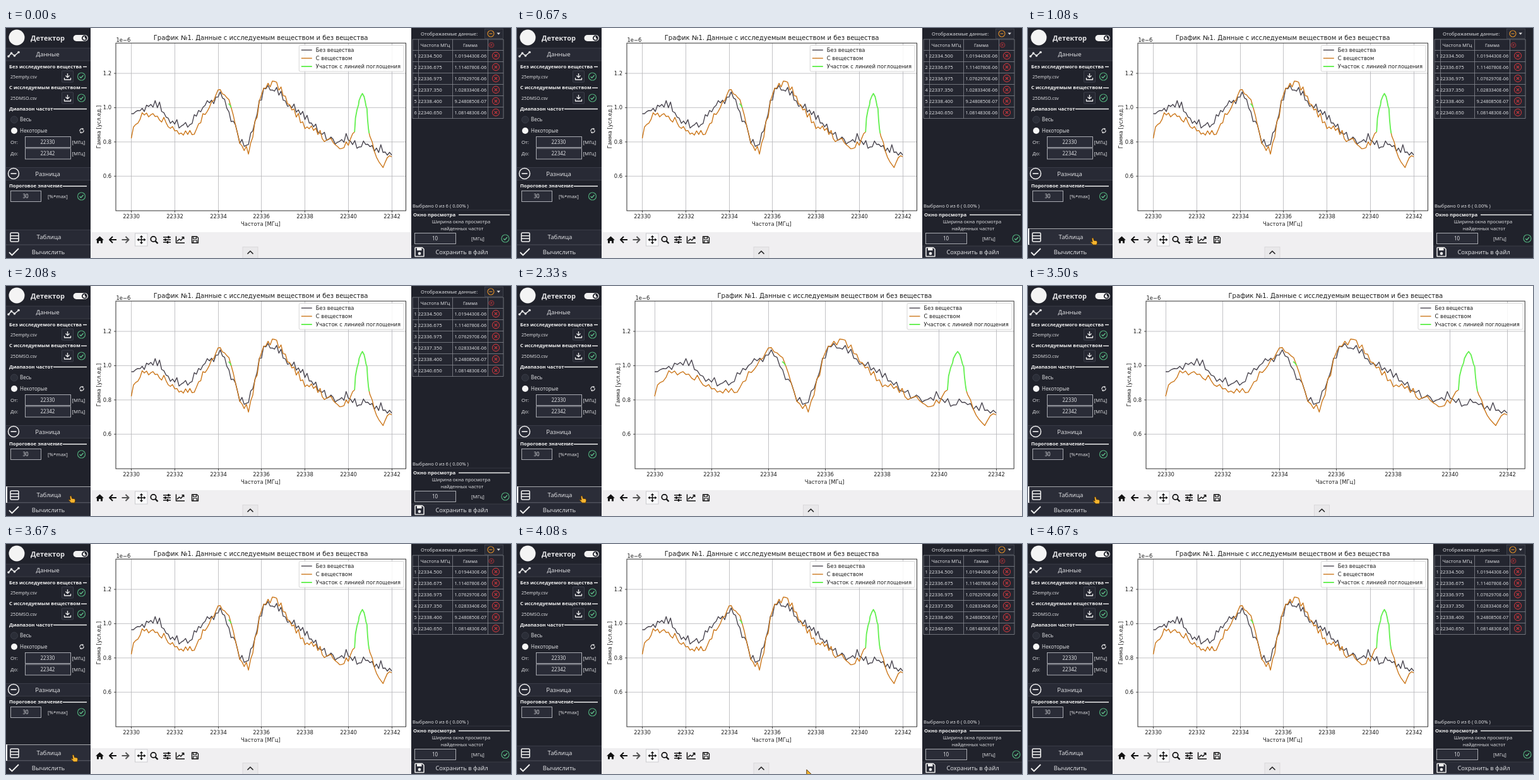
These frames come from a looping animation (800x365 px, 4.76 s). An HTML page:

```html
<!DOCTYPE html>
<html lang="ru">
<head>
<meta charset="utf-8">
<title>Детектор</title>
<style>
  html, body { margin: 0; width: 100%; height: 100%; overflow: hidden; background: #fff; }
  svg { display: block; width: 800px; height: 365px; }
  text { font-family: "Noto Sans", sans-serif; white-space: pre; }
  .plot text { font-family: "DejaVu Sans", sans-serif; }
</style>
</head>
<body>
<svg id="stage" viewBox="0 0 800 365" xmlns="http://www.w3.org/2000/svg"></svg>
<script>
const LOOP = 4760, FPS = 12;
const BG = '#20222b', ROW = '#282a35', FG = '#dcdde0', EDGE = '#3a3c47';
const DARK = '#4a4650', ORANGE = '#cc781c', GREEN = '#62f04e';

const rect = (x, y, w, h, fill, extra = '') =>
  `<rect x="${x}" y="${y}" width="${w}" height="${h}" fill="${fill}" ${extra}/>`;
const path = (d, stroke, w = 1, fill = 'none') =>
  `<path d="${d}" stroke="${stroke}" stroke-width="${w}" fill="${fill}" stroke-linejoin="round"/>`;
const circle = (x, y, r, fill, stroke = 'none', w = 1) =>
  `<circle cx="${x}" cy="${y}" r="${r}" fill="${fill}" stroke="${stroke}" stroke-width="${w}"/>`;
// y is the middle of the capitals
const text = (x, y, s, size = 7.8, anchor = 'start', fill = FG, weight = 400) =>
  `<text x="${x}" y="${y + size * .36}" font-size="${size}" text-anchor="${anchor}" fill="${fill}" font-weight="${weight}">${s}</text>`;
const mid = (x, y, s, size, fill) => text(x, y, s, size, 'middle', fill);
const at = (x, y, body) => `<g transform="translate(${x} ${y})">${body}</g>`;
const line = pts => 'M' + pts.map(p => p.map(v => v.toFixed(1)).join(' ')).join('L');

// --- data: one value every 0.2 MHz, with seeded noise at every 0.1 MHz ---
const empty = [136,133,130,132,124,127,126,133,141,153,154,158,154,155,152,138,132,124,121,120,
  112,113,126,148,154,181,188,186,163,136,112,97,98,101,104,117,124,129,131,139,
  147,150,156,165,171,178,173,182,179,179,180,185,189,187,187,190,195,197,199,201,200];
const filled = [175,154,146,140,143,136,142,148,152,160,163,166,170,170,171,163,151,136,125,114,
  96,104,112,125,155,181,196,198,171,140,108,95,94,83,99,107,120,131,140,149,
  158,162,163,167,177,180,177,184,191,189,184,170,129,104,120,170,196,211,222,206,203];
const peak = [[51.45,165],[51.65,143],[52,130],[52.35,122],[52.5,115],[52.9,108],[53.25,104],
  [53.65,109],[53.9,117],[54.1,124],[54.3,128],[54.45,145],[54.65,160],[54.8,167]];

function jagged(base, seed, rise) {
  const rnd = () => (seed = (seed * 16807) % 2147483647) / 2147483647;
  return base.flatMap((y, i) => {
    if (!i) return [[0, y]];
    const between = (base[i - 1] + y) / 2 + 2 - rise * rnd();
    return [[i - .5, between], [i, y + 5 * (rnd() - .5)]];
  });
}
const emptyPts = jagged(empty, 4177, 15);
const filledPts = jagged(filled, 97731, 12);

function plot(left, right, first, last) {
  const X = i => first + (last - first) * i / 60;
  const mx = (first + last) / 2 - 1.3;
  const curve = (pts, c, w) => path(line(pts.map(([i, y]) => [X(i), y])), c, w);
  const ink = '#1c1c1c';
  let s = '';
  for (let k = 0; k <= 6; k++) {
    const x = Math.floor(X(k * 10)) + .5;
    s += path(`M${x} 24V290`, '#b4b4b8', .8) + path(`M${x} 290v3`, ink, .8) +
      mid(x, 298.5, 22330 + 2 * k, 8.4, ink);
  }
  ['1.2', '1.0', '0.8', '0.6'].forEach((v, k) => {
    const y = 72 + k * 54.4;
    s += path(`M${left} ${y}H${right}`, '#b4b4b8', .8) + path(`M${left} ${y}h-3`, ink, .8) +
      text(left - 7, y, v, 8.4, 'end', ink);
  });
  s += curve(emptyPts, DARK, 1.4) +
    curve([...filledPts.filter(p => p[0] < 51.4), peak[0]], ORANGE, 1.4) +
    curve([peak[peak.length - 1], ...filledPts.filter(p => p[0] > 54.8)], ORANGE, 1.4) +
    curve(peak, GREEN, 1.8) + curve([[22.4, 120], [22.7, 122], [23, 126]], GREEN, 1.7);
  s += rect(left, 24, right - left, 266, 'none', `stroke="${ink}" stroke-width=".9"`);
  const lx = right - 169.2;
  s += rect(lx, 27.5, 166, 41.5, '#fff', 'rx="2" stroke="#ccc" stroke-width=".8" fill-opacity=".85"');
  [['Без вещества', DARK], ['С веществом', ORANGE], ['Участок с линией поглощения', GREEN]].forEach(([v, c], k) => {
    const y = 35 + k * 13;
    s += path(`M${lx + 3.5} ${y}h17`, c, k > 1 ? 1.9 : 1.4) + text(lx + 26.5, y, v, 8.4, 'start', ink);
  });
  s += mid(mx + .2, 15, 'График №1. Данные с исследуемым веществом и без вещества', 10.08, ink) +
    mid(mx, 310.5, 'Частота [МГц]', 8.4, ink) + text(left + .5, 19.3, '1e−6', 8.4, 'start', ink) +
    `<g transform="translate(${left - 27.5} 157) rotate(-90)">${mid(0, 0, 'Гамма [усл.ед.]', 8.4, ink)}</g>`;
  return s;
}

const fold = x => rect(x - 12, 347.5, 24, 18, '#e9e8ea', 'stroke="#d6d5d8" stroke-width=".8"') +
  path(`M${x - 4.5} 358.5l4.5-4.5 4.5 4.5`, '#222', 1.6);

function toolbar() {
  const k = '#111';
  return rect(134, 324, 666, 41, '#f0eff1') +
    at(148.5, 336, path('M-6.5 .5L0-5.5 6.5 .5H4.5V5.5H1.5V2H-1.5V5.5H-4.5V.5Z', 'none', 0, k)) +
    at(169, 336, path('M6 0H-5M0-5L-5 0 0 5', k, 2)) +
    at(189.5, 336, path('M-6 0H5M0-5L5 0 0 5', '#555', 2)) +
    rect(204.5, 326, 19.5, 20, '#f9f9fa', 'stroke="#c4c4c8" stroke-width=".8"') +
    at(214.5, 336, path('M-5 0H5M0-5V5', k, 1.5) +
      path('M-7 0l3-2.6v5.2ZM7 0l-3-2.6v5.2ZM0-7l-2.6 3h5.2ZM0 7l-2.6-3h5.2Z', 'none', 0, k)) +
    at(234.5, 336, circle(-1, -1, 4.2, 'none', k, 1.8) + path('M2 2L6 6', k, 2.4)) +
    at(255, 336, path('M-6-4H6M-6 0H6M-6 4H6', k, 1.3) + path('M2.5-6v4M-2.5-2v4M1 2v4', k, 2.2)) +
    at(276, 336, path('M-6.5-5.5V5H7', k, 1.5) + path('M-5 2.5L-1.5-1 1 1 5.5-4M2.5-4.2H5.7V-1', k, 1.5)) +
    at(299.5, 336, path('M-5-5H3L5-3V5H-5Z', k, 1.3) + path('M-3-5v3.5h5V-5M-3 5V1h6v4', k, 1.2));
}

const tick = (x, y) => circle(x, y, 6, 'none', '#4fa878', 1.2) + at(x, y, path('M-2.8 .2L-.8 2.3 3-2', '#5fc08a', 1.3));
const cross = (x, y, r, c) => circle(x, y, r, 'none', c, 1.1) +
  at(x, y, path(`M${-r * .4} ${-r * .4}l${r * .8} ${r * .8}m0 ${-r * .8}l${-r * .8} ${r * .8}`, c, 1.1));
const field = (x, y, w, h, v) => rect(x + .5, y + .5, w, h, '#2a2c37', 'stroke="#b9bac0" stroke-width=".9"') +
  mid(x + w / 2, y + h / 2 + .5, v, 8);
const head = (x, y, v, from, to) => text(x, y, v, 7.8, 'start', '#f2f2f2', 700) + path(`M${from} ${y + .5}H${to}`, '#eee', 1.4);
const bar = (x, y, w, h) => rect(x, y, w, h, ROW) + path(`M${x} ${y}h${w}M${x} ${y + h}h${w}`, EDGE, 1);
const disk = (x, y) => at(x, y, path('M-6.5-7H4.5L7-4.5V7H-7V-6.5Z', '#eee', 1.5) +
  rect(-4, -6.5, 7.5, 4, '#eee') + circle(0, 2.4, 2.3, '#eee'));

function leftPanel() {
  const fetchRow = (y, v) => text(7, y, v, 7.2) +
    rect(88.5, y - 9, 18, 18, '#252731', 'rx="1" stroke="#454854" stroke-width=".8"') +
    at(97.5, y, path('M0-5V1M-3-1.5L0 1.5 3-1.5M-5 2V5H5V2', '#eee', 1.3)) + tick(119.5, y);
  return rect(0, 0, 134, 365, BG) +
    circle(17, 15, 12.5, '#f4f4f4') + text(39, 16.5, 'Детектор', 11, 'start', '#e6e6e8', 600) +
    rect(106.5, 11, 23.5, 10, '#f2f2f2', 'rx="5"') + circle(124.3, 16, 4.4, BG) +
    at(124.3, 16, path('M.8-2.6A2.7 2.7 0 1 0 2.6 1A2.3 2.3 0 0 1 .8-2.6Z', 'none', 0, '#eee')) +
    bar(0, 32, 134, 20) + path('M4 45l4.5-5 5 4 6.5-5.5', '#eee', 1.6) +
    [[4, 45], [8.5, 40], [13.5, 44], [20, 38.5]].map(p => circle(...p, 1.8, '#eee')).join('') +
    mid(66, 42, 'Данные', 9.6) +
    head(5, 61, 'Без исследуемого вещества', 122, 128) + fetchRow(77, '25empty.csv') +
    head(5, 94.5, 'С исследуемым веществом', 119, 128) + fetchRow(111, '25DMSO.csv') +
    head(5, 128, 'Диапазон частот', 75, 128) +
    circle(13, 145.5, 5.5, '#2b2e38', '#3a3d48') + text(22, 145.5, 'Весь', 8) +
    circle(13, 163, 5, '#f6f6f6') + text(22, 163, 'Некоторые', 8) +
    at(120, 163, path('M-2.8 1.2A3 3 0 0 1 1.2-2.8M2.8-1.2A3 3 0 0 1-1.2 2.8', '#eee', 1.1) +
      path('M.8-4.6L3.2-2.7 .8-1ZM-.8 4.6L-3.2 2.7-.8 1Z', 'none', 0, '#eee')) +
    text(7, 181, 'От:') + field(30, 172, 72, 17, '22330') + text(104.5, 181, '[МГц]') +
    text(7, 199.5, 'До:') + field(30, 190.5, 72, 17, '22342') + text(104.5, 199.5, '[МГц]') +
    bar(0, 221.5, 134, 20) + circle(12, 231, 8.5, 'none', '#eee', 1.5) + path('M7.5 231h9', '#eee', 1.7) +
    mid(66, 231.5, 'Разница', 9.6) +
    head(5, 250.5, 'Пороговое значение', 90, 128) +
    field(7, 258, 48, 17, '30') + text(66, 267, '[%*max]') + tick(119.5, 267) +
    bar(0, 320.5, 134, 23) + bar(0, 344.5, 134, 21) +
    '<g id="hover">' + rect(0, 318, 134, 25.5, '#2b2d38') +
    path('M0 318.5H134', '#a8a9ae', 1) + path('M0 343.5H134', '#50525c', 1) + rect(0, 318, 2, 26, '#fff') + '</g>' +
    rect(7, 325, 13, 14, 'none', 'rx="1.5" stroke="#eee" stroke-width="1.6"') + path('M7 329.7h13M7 334.3h13', '#eee', 1.5) +
    mid(68, 332, 'Таблица', 9.6) +
    path('M5 356l4.5 4.5L20 350', '#eee', 1.8) + mid(67, 356, 'Вычислить', 9.6);
}

function rightPanel() {
  const grid = '#85878e';
  let s = rect(642, 0, 158, 365, BG) + text(657, 9.5, 'Отображаемые данные:', 7.6) +
    rect(758.5, 1.5, 29, 15, '#282a34', 'stroke="#444752" stroke-width=".8"') +
    circle(768, 9, 5, 'none', '#d68a2a', 1.2) + path('M765.5 9h5', '#d68a2a', 1.2) +
    path('M777.5 7.5h5.5l-2.75 3.2Z', 'none', 0, '#ddd') +
    rect(644, 18, 144, 125.5, '#242630') +
    mid(680, 27, 'Частота МГц', 7.7) + mid(735.5, 27, 'Гамма', 7.5) + cross(769, 27, 3.8, '#a13238');
  const rows = ['22334.500 1.0194430E-06', '22336.675 1.1140780E-06', '22336.975 1.0762970E-06',
    '22337.350 1.0283340E-06', '22338.400 9.2480850E-07', '22340.650 1.0814830E-06'];
  rows.forEach((r, i) => {
    const y = 44 + i * 18, [f, g] = r.split(' ');
    s += mid(648.7, y, i + 1, 7.5) + text(652.5, y, f, 7.9) + text(710.5, y, g, 7.4) + cross(776, y, 5.6, '#c0363c');
  });
  for (let i = 0; i < 8; i++) s += path(`M644 ${i ? 17.5 + i * 18 : 18}H788`, grid, .8);
  s += path('M644 18V143.5M653.5 18V143.5M707.5 18V143.5M763.5 18V143.5M788 18V143.5', grid, .8);
  return s + text(644, 282, 'Выбрано 0 из 6 ( 0.00% )', 7.6) +
    path('M642 289H800', EDGE, .8) + head(645, 296, 'Окно просмотра', 717, 798) +
    mid(721, 307.5, 'Ширина окна просмотра', 7.5) + mid(722.5, 318, 'найденных частот', 7.5) +
    field(647, 325, 65, 17, '10') + text(737, 334, '[МГц]') + tick(791, 334) +
    bar(642, 346, 158, 19) + disk(655, 355.5) + mid(722, 356, 'Сохранить в файл', 9.4);
}

const POINTER = ['#4a2c08', .9, '#f6b52e'];
document.getElementById('stage').innerHTML = rect(0, 0, 800, 365, '#fff') +
  '<g class="plot">' + toolbar() +
  `<g id="narrow">${plot(174, 633.5, 198.5, 611) + fold(387)}</g>` +
  `<g id="wide">${plot(187, 787.2, 218, 759) + fold(465.5)}</g></g>` +
  leftPanel() + `<g id="table">${rightPanel()}</g>` +
  '<g id="cursor"><g id="hand">' +
  path('M-1.5 .8Q0-.8 1.2 .8L2 4.2 5.5 4.6Q7.6 5 7.3 7.5L6.3 11.2H.8L-3.3 6.8Q-3 5-1.6 6.2L-.5 6.8Z', ...POINTER) +
  '</g><g id="arrow">' + path('M0 0V10.5L2.6 8.2 4.4 12 6.2 11.2 4.5 7.5H7.8Z', ...POINTER) + '</g></g>';

const el = id => document.getElementById(id);
const show = (id, on) => { el(id).style.display = on ? '' : 'none'; };

// pointer path: [step, x, y]
const moves = [[8, 470, 364], [13, 102.5, 333], [39, 102.5, 333], [42, 106.5, 334.5],
  [44, 106.5, 334.5], [50, 487, 360], [51, 487, 360]];
const ease = u => u * u * (3 - 2 * u);

function pointer(step) {
  if (step < 9 || step > 51) return null;
  const k = moves.findIndex(m => m[0] >= step);
  const [s0, x0, y0] = moves[k - 1], [s1, x1, y1] = moves[k];
  const u = ease((step - s0) / (s1 - s0));
  return [x0 + (x1 - x0) * u, y0 + (y1 - y0) * u];
}

function draw(ms) {
  const step = Math.floor((ms + 5) * FPS / 1000);
  const open = step < 28 || step >= 44;
  const p = pointer(step), over = !!p && p[0] < 134;
  show('narrow', open);
  show('table', open);
  show('wide', !open);
  show('hover', over);
  show('hand', over);
  show('arrow', p && !over);
  if (p) el('cursor').setAttribute('transform', `translate(${p[0]} ${p[1]})`);
}

const start = performance.now();
function loop() {
  draw((performance.now() - start) % LOOP);
  requestAnimationFrame(loop);
}
loop();
</script>
</body>
</html>
```
